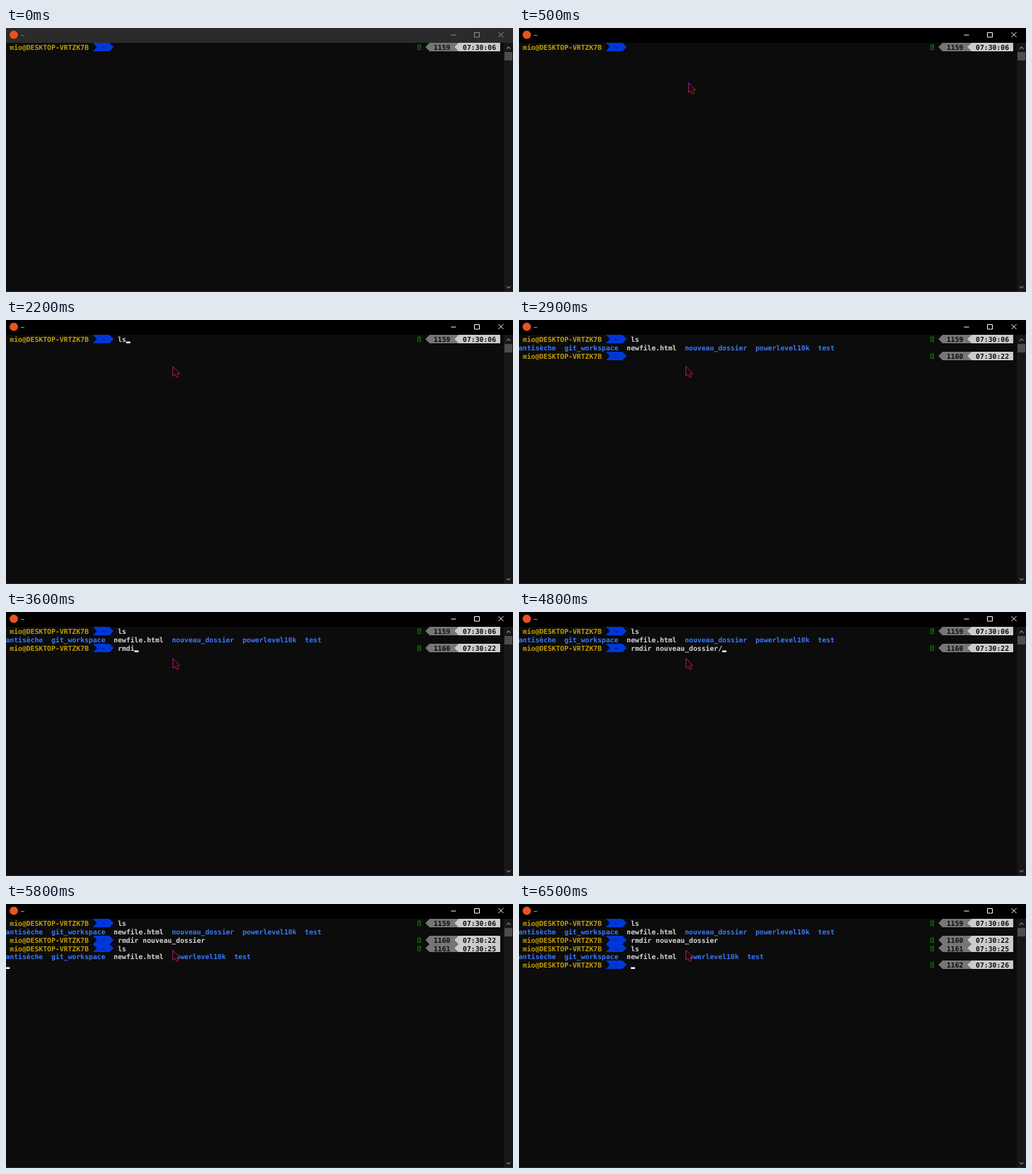
An HTML page for the animation above (7.2 s loop, 716 by 374 pixels).

```html
<!DOCTYPE html>
<html lang="fr">
<head>
<meta charset="utf-8">
<title>Terminal</title>
<style>
  html, body { margin: 0; width: 100%; height: 100%; overflow: hidden; background: #0c0c0c; }
  svg { display: block; width: 716px; height: 374px; }
  text { white-space: pre; text-rendering: geometricPrecision; }
  .mono { font: bold 9.75px "DejaVu Sans Mono", "Liberation Mono", monospace; }
  .title { font: 9.5px "Open Sans", "Noto Sans", sans-serif; }
</style>
</head>
<body>
<svg id="stage" viewBox="0 0 716 374"></svg>
<script>
const LOOP = 7200, CELL = 5.87, LEFT = -0.6, LINE = 11.75, TOP = 21.4;
const BLUE = '#3b78ff', WHITE = '#d6d6d6', DARK = '#0c0c0c';
const stage = document.getElementById('stage');

// [time, prompt index, typed text, cursor visible]
const STEPS = [
  [0, 0, '', 0], [1100, 0, '', 1], [1700, 0, '', 0], [1800, 0, 'l', 1], [2000, 0, 'ls', 1],
  [2400, 1, '', 1], [2900, 1, '', 0], [3000, 1, 'r', 1], [3300, 1, 'rm', 1], [3400, 1, 'rmd', 1],
  [3600, 1, 'rmdi', 1], [3700, 1, 'rmdir', 1], [3900, 1, 'rmdir ', 1], [4200, 1, 'rmdir n', 1],
  [4400, 1, 'rmdir no', 1], [4600, 1, 'rmdir nouveau_dossier', 1], [4800, 1, 'rmdir nouveau_dossier/', 1],
  [5300, 2, '', 1], [5600, 2, 'l', 1], [5700, 2, 'ls', 1], [5800, 2, 'ls', 0], [5900, 3, '', 1]
];
const PROMPT_ROWS = [0, 2, 3, 5];
const CLOCK = ['06', '22', '25', '26'];
const DONE = ['ls', 'rmdir nouveau_dossier', 'ls'];

const colX = col => LEFT + col * CELL;
const rowY = row => Math.round(TOP + row * LINE);
const rect = (x, y, w, h, fill) => `<rect x="${x}" y="${y}" width="${w}" height="${h}" fill="${fill}"/>`;
const line = (d, color, width = 1) => `<path d="${d}" fill="none" stroke="${color}" stroke-width="${width}"/>`;
const print = (col, row, str, fill) =>
  `<text class="mono" x="${colX(col)}" y="${rowY(row) + 9.7}" fill="${fill}">${str}</text>`;
const caret = (col, row) => rect(colX(col), rowY(row + 1) - 2.5, CELL, 2.5, '#fff');

// Band between two columns; each end juts out (1), is notched (-1) or flat (0)
function band(row, from, to, left, right, fill) {
  const y = rowY(row), end = rowY(row + 1), mid = (y + end) / 2, x1 = colX(from), x2 = colX(to);
  return `<path fill="${fill}" d="M${x1} ${y}H${x2}L${x2 + right * CELL} ${mid}L${x2} ${end}H${x1}L${x1 - left * CELL} ${mid}Z"/>`;
}

function prompt(i, typed) {
  const row = PROMPT_ROWS[i], y = rowY(row);
  return print(1, row, 'mio@DESKTOP-VRTZK7B', '#c19c00')
    + band(row, 21, 25, -1, 1, '#0037da') + print(23, row, '~', '#061a60')
    + print(27, row, typed, WHITE)
    + `<rect x="581.5" y="${y + 3}" width="4" height="6.6" fill="none" stroke="#13800e" stroke-width=".9"/>`
    + line(`M583 ${y + 4.9}h1.5l-1 2v1`, '#13800e', .8)
    + band(row, 102, 109, 1, 0, '#767676') + print(103, row, 1159 + i, DARK)
    + band(row, 109, 119, 1, 0, '#ccc') + print(110, row, '07:30:' + CLOCK[i], DARK);
}

function listing(row, folders) {
  return print(0, row, 'antisèche  git_workspace', BLUE)
    + print(26, row, 'newfile.html', WHITE) + print(40, row, folders, BLUE);
}

function frame(active) {
  const ink = active ? '#fff' : '#929292';
  return rect(0, 0, 716, 374, DARK)
    + rect(0, 0, 716, 21, active ? '#000' : '#2b2b2b')
    + '<circle cx="11" cy="9.6" r="5.9" fill="#e95420"/>'
    + `<text class="title" x="20.8" y="13.5" fill="${ink}">~</text>`
    + line('M628.5 10h7M661.5 6.5h7v6.5h-7zM695.5 6l7 7m0-7l-7 7', ink)
    + rect(703, 21, 13, 352, '#171717') + rect(704, 34, 11, 12, '#4d4d4d')
    + line('M707 29.5l2.7-2.7 2.7 2.7M707 365.8l2.7 2.7 2.7-2.7', '#858585', 1.1)
    + rect(0, 373, 716, 1, '#2b2b2b');
}

function pointer(t) {
  if (t < 100) return '';
  const left = (1 - Math.min(1, (t - 100) / 500)) ** 2;
  return `<g transform="translate(${235.7 + 94 * left} ${65.7 + 300 * left})">
    <path d="M0 0V14L3 11.3 5.3 15.7 8 14.4 5.8 10.3 9.7 9.9Z" fill="#0c0c0c" stroke="url(#glow)"/></g>`;
}

const defs = `<defs><linearGradient id="glow" x1="0" y1="0" x2=".5" y2="1">
  <stop stop-color="#8a22b8"/><stop offset=".6" stop-color="#c4143f"/><stop offset="1" stop-color="#c8102c"/>
  </linearGradient></defs>`;

function scene(t) {
  const [, current, typed, blink] = STEPS.filter(s => s[0] <= t).pop();
  let out = defs + frame(t >= 400);
  for (let i = 0; i <= current; i++) out += prompt(i, i < current ? DONE[i] : typed);
  if (current > 0) out += listing(1, 'nouveau_dossier  powerlevel10k  test');
  if (t >= 5800) out += listing(4, ' owerlevel10k  test');
  if (blink) out += caret(27 + typed.length, PROMPT_ROWS[current]);
  else if (t >= 5800) out += caret(0, 5);
  return out + pointer(t);
}

let shown = -1;
function tick() {
  const t = Math.floor(performance.now() % LOOP / 100) * 100;
  if (t !== shown) stage.innerHTML = scene(shown = t);
  requestAnimationFrame(tick);
}
tick();
</script>
</body>
</html>
```
